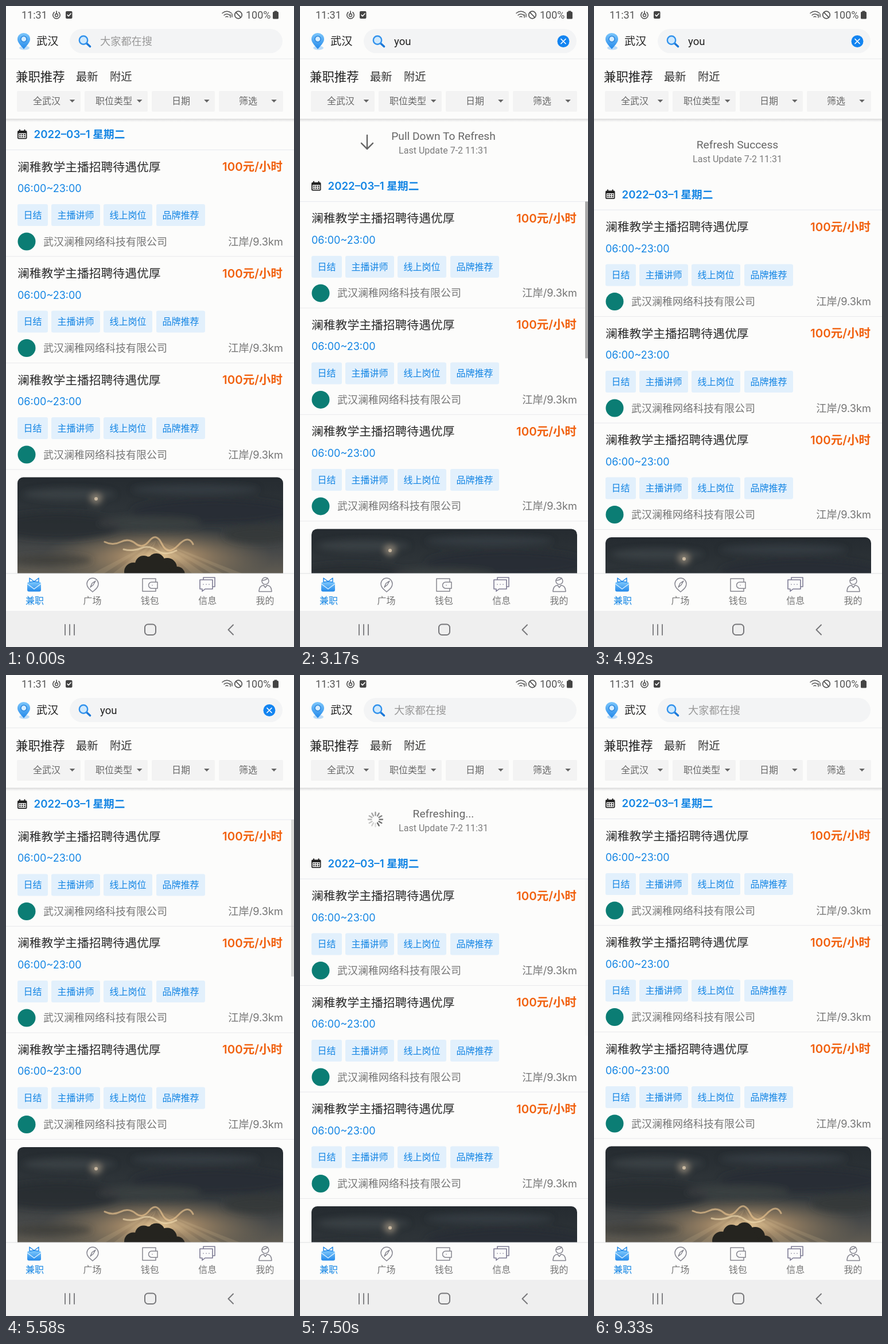
An HTML page for the animation above (9.74 s loop, 502x1116 px).

```html
<!DOCTYPE html>
<html lang="zh-CN">
<head>
<meta charset="utf-8">
<title>兼职推荐</title>
<style>
html, body { margin: 0; width: 100%; height: 100%; overflow: hidden; background: #fcfcfb; }
svg { display: block; width: 100%; height: 100%; font-family: Inter, "Noto Sans CJK SC", "Noto Sans CJK", sans-serif; }
.r { font-family: Roboto, "Noto Sans CJK SC", sans-serif; }
.line { fill: none; stroke-linecap: round; stroke-linejoin: round; }
</style>
</head>
<body>
<svg id="stage" viewBox="0 0 502 1116" preserveAspectRatio="none">
  <defs>
    <clipPath id="listClip"><rect y="198" width="502" height="790"/></clipPath>
    <clipPath id="photoClip"><rect x="20" y="820.5" width="463" height="260" rx="10"/></clipPath>
    <linearGradient id="shade" x2="0" y2="1">
      <stop stop-color="#d4d4d4"/><stop offset="1" stop-color="#fcfcfb" stop-opacity="0"/>
    </linearGradient>
    <linearGradient id="blue" x2="0" y2="1">
      <stop stop-color="#7cc6fb"/><stop offset="1" stop-color="#2389ea"/>
    </linearGradient>
    <linearGradient id="sky" x2="0" y2="1">
      <stop stop-color="#252b30"/><stop offset=".3" stop-color="#31373b"/>
      <stop offset=".5" stop-color="#474949"/><stop offset=".7" stop-color="#6a6355"/>
    </linearGradient>
    <radialGradient id="sun">
      <stop stop-color="#f0cf9a" stop-opacity=".95"/><stop offset=".35" stop-color="#c9a272" stop-opacity=".6"/>
      <stop offset="1" stop-color="#8b7a5c" stop-opacity="0"/>
    </radialGradient>
    <filter id="soft" x="-30%" y="-60%" width="160%" height="220%"><feGaussianBlur stdDeviation="6"/></filter>
  </defs>
  <rect width="502" height="1116" fill="#fcfcfb"/>
  <g clip-path="url(#listClip)"><g id="list"></g></g>
  <g id="top"></g>
  <g id="tabs"></g>
  <g id="keyboard"></g>
  <g id="nav"></g>
</svg>
<script>
const LOOP = 9740, REST = 104.5, PEAK = 183;
const BLUE = '#1385e4', DARK = '#2a2a2a', GRAY = '#757575';
const $ = id => document.getElementById(id);

const text = (x, y, s, size, fill, attrs = '') =>
  `<text x="${x}" y="${y}" font-size="${size}" fill="${fill}" ${attrs}>${s}</text>`;
const rect = (x, y, w, h, fill, rx = 0, attrs = '') =>
  `<rect x="${x}" y="${y}" width="${w}" height="${h}" rx="${rx}" fill="${fill}" ${attrs}/>`;
const dot = (x, y, r, fill, attrs = '') => `<circle cx="${x}" cy="${y}" r="${r}" fill="${fill}" ${attrs}/>`;
const line = (d, color, w = 1.6, attrs = '') =>
  `<path class="line" d="${d}" stroke="${color}" stroke-width="${w}" ${attrs}/>`;
const ring = (x, y, r, color, w = 1.6) => dot(x, y, r, 'none', `stroke="${color}" stroke-width="${w}"`);
const MID = 'text-anchor="middle"', END = 'text-anchor="end"', MEDIUM = 'font-weight="500"';

function card(y) {
  const tags = [[20, 53, '日结'], [79, 85, '主播讲师'], [170, 85, '线上岗位'], [262, 85, '品牌推荐']];
  return `<g transform="translate(0 ${y})">` +
    text(20, 37, '澜稚教学主播招聘待遇优厚', 20.8, DARK, MEDIUM) +
    text(482, 36.5, '100元/小时', 20.5, '#f1610f', END + ' font-weight="600"') +
    text(20, 73.5, '06:00~23:00', 18, BLUE) +
    tags.map(([x, w, s]) => rect(x, 94.5, w, 38, '#e2f0fc', 3) +
      text(x + w / 2, 119.3, s, 16, BLUE, MID)).join('') +
    dot(36, 159.5, 15.5, '#0b7d74') +
    text(65, 166, '武汉澜稚网络科技有限公司', 18, GRAY) +
    text(483, 166, '江岸/9.3km', 18.2, GRAY, END) +
    rect(0, 185, 502, 1, '#e9e9ec') + '</g>';
}

function photo() {
  const rays = [-250, -170, -95, 60, 140, 215, 290].map(dx =>
    `<path d="M262 930L${262 + dx} 1060h46z" fill="#d9c193" opacity=".16"/>`).join('');
  const cloud = (x, y, rx, ry, fill, o) =>
    `<ellipse cx="${x}" cy="${y}" rx="${rx}" ry="${ry}" fill="${fill}" opacity="${o}"/>`;
  return '<g clip-path="url(#photoClip)">' + rect(20, 820, 463, 262, 'url(#sky)') +
    '<ellipse cx="265" cy="958" rx="200" ry="52" fill="url(#sun)"/>' + rays +
    '<g filter="url(#soft)">' +
    cloud(90, 905, 110, 24, '#262b2f', .8) + cloud(360, 880, 140, 22, '#292e32', .8) +
    cloud(250, 900, 90, 12, '#3d4143', .8) + cloud(110, 850, 80, 10, '#454b4f', .6) +
    cloud(330, 842, 110, 9, '#3f464b', .6) + cloud(440, 920, 60, 16, '#34383a', .8) +
    cloud(80, 965, 70, 10, '#3b3c3a', .7) + cloud(157, 858, 9, 9, '#b9a993', .7) + '</g>' +
    line('M172 933q14 7 28 0t26 3 24-5 22 6 28 2 26-2', '#ecc591', 3, 'opacity=".65"') +
    line('M205 946q16 4 30-2t28 4 34 0', '#f6dfb2', 3, 'opacity=".6"') +
    dot(157, 858, 3, '#c9b8a0') +
    [[222, 985, 16], [240, 972, 15], [262, 968, 15], [281, 978, 17], [298, 990, 14], [255, 990, 32]]
      .map(([x, y, r]) => dot(x, y, r, '#25241f')).join('') + '</g>';
}

function buildList() {
  const petals = Array.from({ length: 12 }, (_, i) =>
    `<path d="M0-7V-12.5" stroke="#606060" stroke-width="2.3" stroke-linecap="round" opacity="${.22 + i * .07}" transform="rotate(${i * 30})"/>`).join('');
  $('list').innerHTML =
    `<g id="spinner">${petals}</g>` +
    line('M117 135v24M107 149l10 10 10-10', '#666', 2.4, 'id="arrow"') +
    text(250, 143.5, '', 19.2, '#666', `id="status" class="r" ${MID}`) +
    text(250, 167, 'Last Update 7-2 11:31', 16, '#7c7c7c', `class="r" ${MID}`) +
    rect(20, 217, 16.5, 14.5, '#222', 2) + rect(21.8, 221.6, 13, 8.2, '#fcfcfb') +
    rect(23, 215, 2, 4, '#222') + rect(31.5, 215, 2, 4, '#222') +
    [0, 1, 2, 3, 4, 5].map(i => rect(23.2 + i % 3 * 4, 223 + (i / 3 | 0) * 3.4, 2.4, 2, '#222')).join('') +
    text(48.5, 230, '2022–03–1 星期二', 18.7, BLUE, 'font-weight="600"') +
    rect(0, 250, 502, 1, '#e6e8ee') +
    [0, 1, 2].map(i => card(250.5 + i * 185.5)).join('') + photo() +
    rect(497, 250.5, 5, 273, '#a9a9a9', 0, 'id="bar"');
}

function buildTop() {
  const filters = [[19, 111, '全武汉', 71], [137, 110, '职位类型', 188], [254, 110, '日期', 305], [371, 112, '筛选', 422]];
  $('top').innerHTML =
    rect(0, 0, 502, 197, '#fcfcfb') + rect(0, 196.5, 502, 7, 'url(#shade)') +
    text(27, 22.3, '11:31', 18, '#555', 'class="r"') +
    line('M84 11a6.2 6.2 0 1 0 8 0M88 9v5', '#555', 1.7) + ring(88, 16, 2.5, '#555', 1.5) +
    rect(104, 9, 11.5, 13, '#444', 2) + line('M107 15.5l2 2.2 4-4.5', '#fff', 1.6) +
    line('M377 12.5q8-6.5 16 0M380 16q5-4 10 0M383 19q2-1.6 4 0M391 15v5M394 14v5', '#555', 1.5) +
    ring(405, 15.5, 6.3, '#555', 1.7) + line('M400.7 11.2l8.6 8.6', '#555', 1.7) +
    text(418, 22.3, '100%', 18, '#555', 'class="r"') +
    rect(465, 10, 10, 12.5, '#444', 1.5) + rect(467.5, 8.5, 5, 2, '#444') +
    '<ellipse cx="32" cy="73" rx="9" ry="3.5" fill="#bcdcf8"/>' +
    '<path d="M31 75C24 67 20 63 20 57.500a11 10.500 0 0 1 22 0C42 63 38 67 31 75z" fill="url(#blue)"/>' +
    dot(31, 57.5, 5, '#d6edff', 'stroke="#2b86dd" stroke-width="1.500"') +
    text(53, 68.3, '武汉', 19.2, '#222') +
    rect(111, 40, 371, 42, '#f3f4f5', 21) +
    line('M140.500 65l6 5.500', '#1b78d8', 3.6) + dot(135, 59.500, 7.2, '#cfe9fd', 'stroke="#3292ec" stroke-width="2.400"') +
    text(164, 68.2, '', 18.2, '#999', 'id="query" class="r"') +
    rect(164, 50, 1.6, 22, '#263a55', 0, 'id="caret"') +
    `<g id="clear">${dot(459, 61.5, 10.5, '#1284f1')}${line('M455 57.500l8 8m0-8l-8 8', '#fff', 1.7)}</g>` +
    rect(0, 91.5, 502, 1, '#e7e9ec') +
    text(17, 130.7, '兼职推荐', 21.4, '#222', MEDIUM) +
    text(122, 130, '最新', 19.3, '#333') + text(181, 130, '附近', 19.3, '#333') +
    filters.map(([x, w, s, c], i) => rect(x, 148, w, 36, '#f3f3f3', 2) + text(c, 171.3, s, 16, '#666', MID) +
      `<path d="M${110.700 + i * 117.200} 163h9.600l-4.800 5z" fill="#666"/>`).join('');
}

function buildTabs() {
  const c = '#85858f';
  $('tabs').innerHTML = rect(0, 988, 502, 66, '#fcfcfb') + rect(0, 987.5, 502, 1, '#dedfe2') +
    rect(37, 1003, 24, 16.5, 'url(#blue)', 3) +
    line('M37 1006l12 9 12-9', '#d9efff', 1.5) +
    `<path class="line" d="M49 1002l-8-6v7zM49 1002l8-6v7z" fill="#9fd4fc" stroke="#258bea" stroke-width="1.500"/>` +
    line('M151 1020c-6-5-10-8-10-14a10 10 0 0 1 20 0c0 6-4 9-10 14zM156 1001l-4 7-5 4 3-7z', c, 1.5) +
    line('M261 1002v-5h-23v22h23v-5M264 1003h-10a5.500 5.500 0 0 0 0 11h10zM255 1008.500h.100', c, 1.5) +
    line('M344 999v-4h20v16h-4M338 999h22v16h-13l-5 4v-4h-4zM344 1007h.100M349 1007h.100M354 1007h.100', '#7d7b94', 1.6) +
    ring(452, 1001, 6, c, 1.5) + line('M446 1000q7 0 10-4M441 1019.500q0-10 8-11l3 4 3-4q8 1 8 11z', c, 1.5) +
    ['兼职', '广场', '钱包', '信息', '我的'].map((s, i) =>
      text(50 + i * 100.4, 1040.7, s, 16, i ? '#777' : BLUE, MID + (i ? '' : ' ' + MEDIUM))).join('');
}

function buildKeyboard() {
  const k = '#252525', pitch = 48.75, mod = '#c9c9cb';
  const key = (x, y, w, h, fill, id = '') =>
    rect(x, y + 1.5, w, h, '#c6c6c9', 6) + rect(x, y, w, h, fill, 6, id);
  const row = (chars, x, y, h, size) => [...chars].map((ch, i) =>
    key(x + i * pitch, y, 41, h, '#fdfdfd', `id="key-${ch}"`) +
    text(x + 20.5 + i * pitch, y + h / 2 + size * .34, ch, size, k, `class="r" ${MID}`)).join('');
  const face = x => line(`M${x - 5} 681q5 5.500 10 0M${x - 4} 674.500h.100M${x + 4} 674.500h.100`, k, 2.2);
  $('keyboard').innerHTML = rect(0, 653, 502, 402, '#e3e3e4') + rect(0, 653, 502, 53, '#e8e8e9') +
    ring(37, 678.5, 11, k, 1.9) + face(37) +
    line('M104 668h12q5 0 5 5v7l-9 9h-8q-5 0-5-5v-11q0-5 5-5zM121 680h-5q-4 0-4 4v5', k, 1.9) + face(109) +
    rect(172.5, 668, 21.5, 21, 'none', 4, `stroke="${k}" stroke-width="1.900"`) +
    text(183.3, 682.3, 'GIF', 10, k, `class="r" ${MID} font-weight="700"`) +
    rect(253, 666, 8.5, 15, k, 4.2) + line('M249 677a8.300 8.300 0 0 0 16.500 0M257.200 686v5', k, 2) +
    line('M327 667h6l1 4 4 2 4-1 3 5-3 3v2l3 3-3 5-4-1-4 2-1 4h-6l-1-4-4-2-4 1-3-5 3-3v-2l-3-3 3-5 4 1 4-2z', k, 1.9, 'transform="translate(33 68.100) scale(.9)"') + ring(330, 679, 3.6, k, 1.9) +
    line('M392 672v-3h16v3M400 669v18M397 687h6M404 688l2-6 9-9 3 3-9 9z', '#bcbcc2', 1.9) +
    [463, 471.5, 480].map(x => dot(x, 679, 2.5, k)).join('') +
    row('1234567890', 11, 715, 47, 25) + row('qwertyuiop', 11, 772, 59, 29) +
    row('asdfghjkl', 35.5, 840.5, 59, 29) + row('zxcvbnm', 83.5, 909.5, 59, 29) +
    key(11, 909.5, 58, 59, mod) + line('M40 928l10.500 11h-6v10h-9v-10h-6z', k, 2) +
    key(433, 909.5, 58, 59, mod) + line('M456 930h18v18h-18l-8-9zM460.500 935l8 8m0-8l-8 8', k, 2) +
    key(11, 979, 66, 59, mod) + text(44, 1017, '!#1', 24, k, `class="r" ${MID}`) +
    key(84, 979, 41, 59, mod) + ring(104.5, 1008, 11, k, 1.8) +
    line('M93.500 1008h22M104.500 997q-10 11 0 22q10-11 0-22M96 1002h17M96 1014h17', k, 1.5) +
    key(133, 979, 41, 59, '#fdfdfd') + text(153.5, 1021, ',', 29, k, `class="r" ${MID}`) +
    key(182, 979, 187, 59, '#fdfdfd') + text(275.5, 1014.5, 'English (US)', 16.3, k, `class="r" ${MID}`) +
    key(377, 979, 41, 59, '#fdfdfd') + text(397.5, 1019, '.', 29, k, `class="r" ${MID}`) +
    key(425, 979, 66, 59, mod, 'id="key-search"') + ring(456, 1005.5, 8, '#1a7fe0', 2.2) +
    line('M462 1011.500l7 7.500', '#1a7fe0', 2.2);
}

function buildNav() {
  const c = '#77777a';
  const dots = Array.from({ length: 12 }, (_, i) =>
    rect(459 + i % 6 * 4.3, 1079 + (i / 6 | 0) * 4.5, 2.4, 2.4, c)).join('');
  $('nav').innerHTML = rect(0, 1053, 502, 63, '#efefef', 0, 'id="navBg"') +
    line('M103 1077v18M111 1077v18M119 1077v18', c, 1.8) +
    rect(242, 1076.5, 19, 18.5, 'none', 5.5, `stroke="${c}" stroke-width="2"`) +
    line('M396 1077.500l-8.500 8.500 8.500 8.500', c, 2, 'id="back"') +
    `<g id="hide">${line('M383.500 1082l8.500 8.500 8.500-8.500', c, 2)}${dots}${rect(459, 1088, 3, 2.4, c)}${rect(464, 1088, 14, 2.4, c)}${rect(480, 1088, 3, 2.4, c)}</g>`;
}

const clamp = v => Math.max(0, Math.min(1, v));
const span = (t, from, to) => clamp((t - from) / (to - from));
const easeOut = u => 1 - (1 - u) ** 2;
const show = (id, on) => $(id).setAttribute('visibility', on ? 'visible' : 'hidden');
const set = (id, name, value) => $(id).setAttribute(name, value);

// Each refresh opens past its rest height, settles, reports success, then closes.
const refreshes = [{ open: 3085, close: 5316 }, { open: 6360, close: 8533 }];
const presses = [[1420, 'y'], [1920, 'o'], [2250, 'u'], [2500, 'search']];
const FOCUS = 420, BLUR = 2860, CLEARED = 6240;

function pull(t, { open, close }) {
  return PEAK * easeOut(span(t, open, open + 300)) -
    (PEAK - REST) * easeOut(span(t, open + 300, open + 600)) -
    REST * easeOut(span(t, close, close + 300));
}

function drawRefresh(t) {
  const r = t < 6000 ? refreshes[0] : refreshes[1];
  const pulling = t < r.open + 300, done = t >= r.close - 480;
  set('list', 'transform', `translate(0 ${pull(t, r).toFixed(2)})`);
  $('status').textContent = pulling ? 'Pull Down To Refresh' : done ? 'Refresh Success' : 'Refreshing...';
  show('arrow', pulling);
  show('spinner', !pulling && !done);
  set('spinner', 'transform', `translate(131.5 147) rotate(${Math.floor(t / 1000 * 12) * 30})`);
  const bar = t < r.open ? 0 : t < r.close
    ? 1 - span(t, r.open + 900, r.open + 1150)
    : 1 - span(t, r.close + 100, r.close + 390);
  set('bar', 'opacity', bar);
}

function drawInput(t) {
  const typed = t < CLEARED ? presses.filter(([at, k]) => at <= t && k.length === 1).map(p => p[1]).join('') : '';
  $('query').textContent = typed || '大家都在搜';
  set('query', 'fill', typed ? '#222' : '#999');
  set('query', 'font-size', typed ? 18.6 : 18.2);
  set('query', 'y', typed ? 67.5 : 68.2);
  show('clear', typed);
  const focused = t >= FOCUS && t < BLUR;
  const last = presses.reduce((m, [at]) => at <= t ? at : m, FOCUS);
  show('caret', focused && (t - last) % 1000 < 500);
  set('caret', 'x', typed ? 164.5 + $('query').getComputedTextLength() : 164);
  presses.forEach(([at, k]) => {
    const base = k.length > 1 ? '#c9c9cb' : '#fdfdfd';
    set('key-' + k, 'fill', t >= at && t < at + 120 ? '#b5b5b8' : base);
  });
  const up = easeOut(span(t, 540, 860)) - easeOut(span(t, 2560, BLUR));
  set('keyboard', 'transform', `translate(0 ${((1 - up) * 403).toFixed(2)})`);
  show('keyboard', up > 0);
  set('navBg', 'fill', up > 0 ? '#e3e3e4' : '#efefef');
  show('back', !focused);
  show('hide', focused);
}

buildList(); buildTop(); buildTabs(); buildKeyboard(); buildNav();
const start = performance.now();
function tick() {
  const t = (performance.now() - start) % LOOP;
  drawRefresh(t);
  drawInput(t);
  requestAnimationFrame(tick);
}
tick();
</script>
</body>
</html>
```
